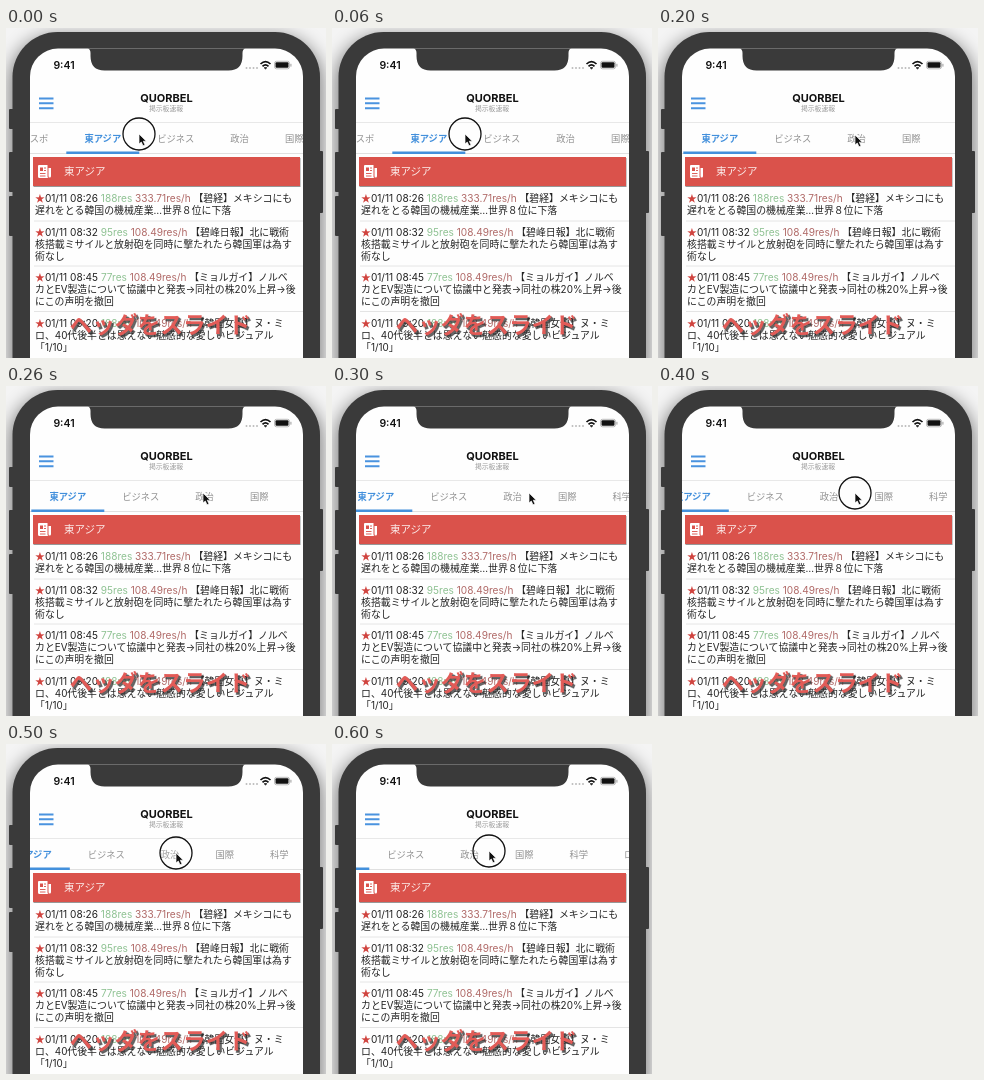
An HTML page that plays this animation: 320x330 px, repeating every 700 ms.

```html
<!DOCTYPE html>
<html lang="ja">
<head>
<meta charset="utf-8">
<title>Header slide</title>
<style>
  html, body { margin: 0; width: 100%; height: 100%; overflow: hidden; background: #ddd; }
  svg { display: block; width: 320px; height: 330px; }
  text { font-family: Inter, "Noto Sans CJK JP", "Noto Sans CJK", sans-serif; white-space: pre; }
  .bold { font-weight: 700; }
  .mid { text-anchor: middle; }
  .list { font-size: 9.9px; fill: #222; }
  .meta { font-size: 10.1px; }
  .star { font-family: "Noto Sans CJK JP", "Noto Sans CJK", sans-serif; }
  .tab { font-size: 9.3px; fill: #929292; }
  .tab.on { font-weight: 700; fill: #4390dc; }
  .caption { font-size: 22.7px; font-weight: 700; }
</style>
</head>
<body>
<svg viewBox="0 0 320 330">
  <defs>
    <filter id="soft" x="-20%" width="140%"><feGaussianBlur stdDeviation="9"/></filter>
    <filter id="slight"><feGaussianBlur stdDeviation=".7"/></filter>
    <clipPath id="screen"><rect x="24" y="20.500" width="273" height="360" rx="28"/></clipPath>
  </defs>

  <rect width="320" height="330" fill="#f4f4f4"/>
  <rect x="4" y="8" width="312" height="400" rx="46" opacity=".5" filter="url(#soft)"/>
  <g fill="#3a3a3a">
    <rect x="3" y="81" width="5" height="20" rx="1"/>
    <rect x="3" y="124" width="5" height="40" rx="1"/>
    <rect x="3" y="168" width="5" height="40" rx="1"/>
    <rect x="312" y="123" width="5" height="62" rx="1"/>
  </g>
  <rect x="6.500" y="4" width="307.500" height="400" rx="45" fill="#3a3a3a"/>

  <g clip-path="url(#screen)">
    <rect x="24" y="20" width="273" height="312" fill="#fefefe"/>
    <path d="M80 19.500H241Q236.500 20.500 236.500 25V28Q236.500 42.500 222.500 42.500H98.500Q84.500 42.500 84.500 28V25Q84.500 20.500 80 19.500Z" fill="#3a3a3a"/>
    <text x="58" y="40.800" class="mid" font-weight="600" font-size="10.500" fill="#111">9:41</text>
    <g fill="#bbb">
      <circle cx="240.500" cy="40" r="1"/><circle cx="244" cy="40" r="1"/>
      <circle cx="247.500" cy="40" r="1"/><circle cx="251" cy="40" r="1"/>
    </g>
    <g fill="none" stroke="#111" stroke-width="1.700">
      <path d="M254.500 36Q259.500 31.300 264.500 36M256.500 38.300Q259.500 35.300 262.500 38.300"/>
      <path d="M258.300 39.800L259.500 40.800L260.700 39.800Z" fill="#111" stroke-width="1"/>
    </g>
    <rect x="268.500" y="33.300" width="15" height="7.500" rx="2" fill="none" stroke="#aaa" stroke-width=".8"/>
    <rect x="269.500" y="34.300" width="13" height="5.500" rx="1" fill="#111"/>
    <rect x="284.300" y="35.800" width="1.200" height="2.800" fill="#aaa"/>

    <path d="M33 70.400H47.500M33 75.300H47.500M33 80.200H47.500" stroke="#4a93df" stroke-width="2"/>
    <text x="160.500" y="74" class="bold mid" font-size="11" fill="#111">QUORBEL</text>
    <text x="160" y="82.500" class="mid" font-size="6.800" fill="#999">掲示板速報</text>
    <path d="M24 94.500H297" stroke="#e2e2e2" stroke-width=".8"/>

    <path d="M24 125.500H297" stroke="#d8d8d8" stroke-width=".8"/>
    <g id="tabs"></g>

    <rect x="27.500" y="130" width="267" height="29" opacity=".4" filter="url(#slight)"/>
    <rect x="27" y="129" width="267" height="29" fill="#da524b"/>
    <path d="M33 137H41.500V148.500Q41.500 150 43 150H33.500Q32 150 32 148.500V138Q32 137 33 137Z" fill="#fff"/>
    <path d="M42.500 140H45V148Q45 149.500 43.700 149.500Q42.500 149.500 42.500 148Z" fill="#fff"/>
    <path d="M34 145.500H39.500M34 148H39.500M38 140H40M38 142.500H40" stroke="#da524b" stroke-width=".9"/>
    <rect x="34" y="139.500" width="3" height="3.500" fill="#da524b"/>
    <text x="58" y="147" font-size="10.500" fill="#fbeae8">東アジア</text>

    <g id="list"></g>
    <path d="M28 193H297M28 238H297M28 283.500H297" stroke="#dedede" stroke-width=".8"/>
  </g>

  <text x="65.300" y="306.500" class="caption" fill="#333" fill-opacity=".75" stroke="#333" stroke-opacity=".4" filter="url(#slight)">ヘッダをスライド</text>
  <text x="63.500" y="305" class="caption" fill="#e25b57">ヘッダをスライド</text>

  <g id="pointer">
    <circle id="touch" r="16" fill="#fff" fill-opacity=".15" stroke="#111" stroke-width="1.300"/>
    <path d="M0 0V10L2.300 8L4 11.800L6 10.900L4.300 7.200H7.300Z" fill="#111" stroke="#fff" stroke-width=".7"/>
  </g>
</svg>
<script>
const $ = id => document.getElementById(id);

function add(parent, name, attrs, content = "") {
  const node = document.createElementNS("http://www.w3.org/2000/svg", name);
  for (const key in attrs) node.setAttribute(key, attrs[key]);
  node.textContent = content;
  return parent.appendChild(node);
}

// Each tab is as wide as its label plus equal side padding.
const tabs = ["芸スポ", "東アジア", "ビジネス", "政治", "国際", "科学", "ロシア"];
let edge = -3.5;
for (const label of tabs) {
  const width = label.length * 9.2 + 36.2;
  const active = label === "東アジア";
  add($("tabs"), "text", {
    x: edge + width / 2, y: 113.8, class: active ? "tab mid on" : "tab mid"
  }, label);
  if (active) add($("tabs"), "rect", { x: edge, y: 123.5, width, height: 2.5, fill: "#4390dc" });
  edge += width;
}

const posts = [
  [174, "08:26", "188", "333.71", "【碧経】メキシコにも", "遅れをとる韓国の機械産業…世界８位に下落"],
  [208, "08:32", "95", "108.49", "【碧峰日報】北に戦術", "核搭載ミサイルと放射砲を同時に撃たれたら韓国軍は為す", "術なし"],
  [253, "08:45", "77", "108.49", "【ミョルガイ】ノルベ", "カとEV製造について協議中と発表→同社の株20%上昇→後", "にこの声明を撤回"],
  [299, "09:20", "188", "108.49", "【韓国女優】ヌ・ミ", "ロ、40代後半とは思えない魅惑的な愛しいビジュアル", "「1/10」"]
];
for (const [y, time, count, rate, title, ...rest] of posts) {
  const line = add($("list"), "text", { x: 29, y, class: "list" });
  const meta = (text, fill, type = "meta") => add(line, "tspan", { class: type, fill }, text);
  meta("★", "#d0443f", "star");
  meta(`01/11 ${time} `, "#222");
  meta(`${count}res `, "#8fc293");
  meta(`${rate}res/h `, "#b06a68");
  add(line, "tspan", {}, title);
  rest.forEach((text, i) =>
    add($("list"), "text", { x: 29, y: y + 12.2 * (i + 1), class: "list" }, text));
}

// Held poses: scroll distance, pointer position, touch shown.
const poses = [
  [0, 133, 106, true],
  [9, 160, 107, false],
  [35, 197, 107, false],
  [53, 197, 107, false],
  [62.5, 197, 107, true],
  [69.5, 170, 109, true],
  [96, 157, 107, true]
];

function render(ms) {
  const [scroll, x, y, touching] = poses[Math.floor(ms % 700 / 100)];
  $("tabs").setAttribute("transform", `translate(${-scroll} 0)`);
  $("pointer").setAttribute("transform", `translate(${x} ${y})`);
  $("touch").setAttribute("visibility", touching ? "visible" : "hidden");
}

const start = performance.now();
function tick() {
  render(performance.now() - start);
  requestAnimationFrame(tick);
}
tick();
</script>
</body>
</html>
```
